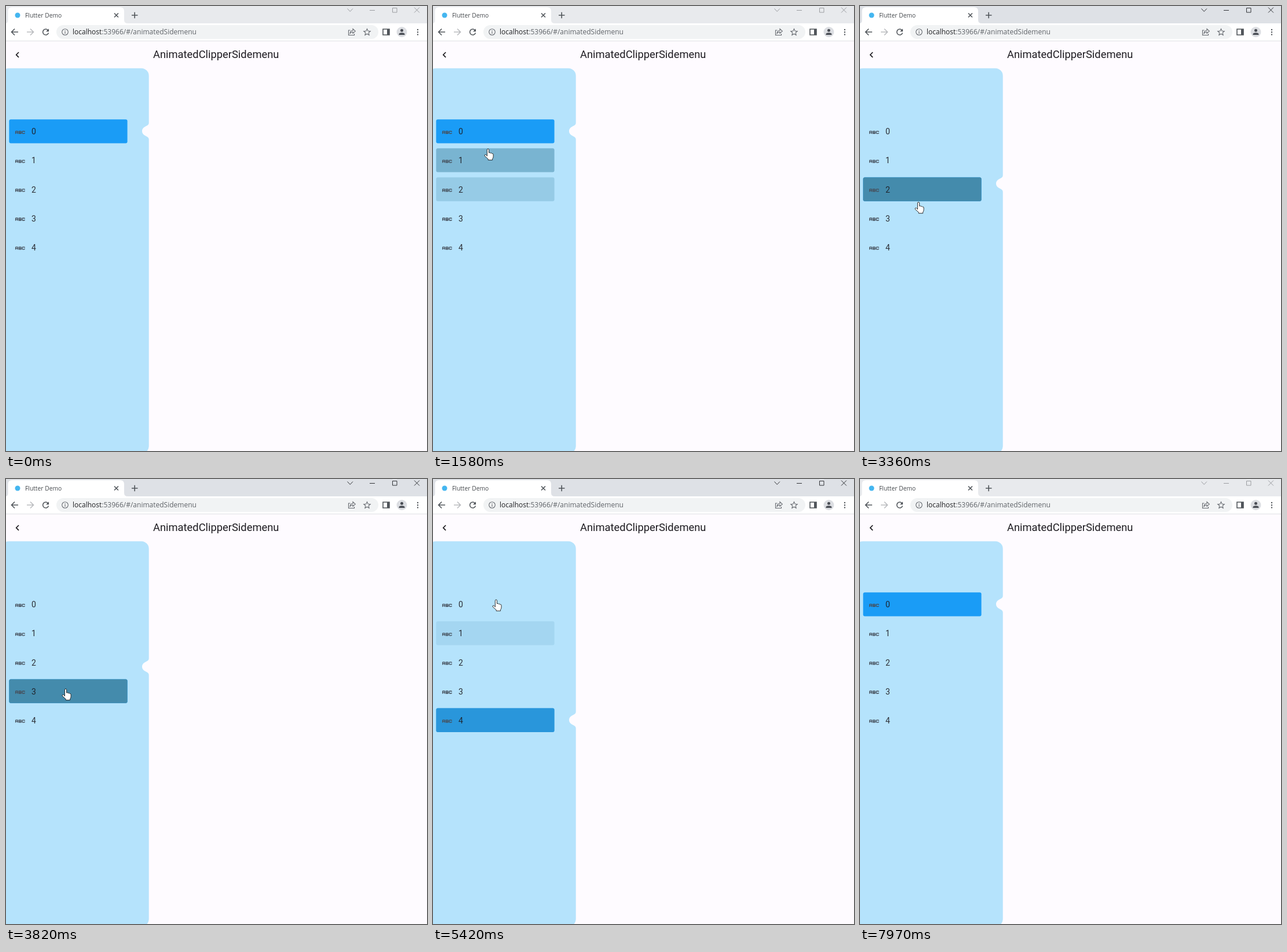
Animation, 727 px wide and 770 px high, one loop 8030 ms. Source, as an HTML page:

```html
<!DOCTYPE html>
<html lang="en">
<head>
<meta charset="utf-8">
<title>Animated side menu</title>
<style>
  html, body { margin: 0; width: 100%; height: 100%; overflow: hidden; background: #fefbff; }
  svg { display: block; }
  .ui { font-family: "Open Sans", "Noto Sans", sans-serif; }
  .app { font-family: Roboto, sans-serif; fill: #1d1b20; }
  .line { fill: none; stroke: #50555a; stroke-width: 1.6; }
  .soft { fill: none; stroke: #666a70; stroke-width: 1.1; }
  .thin { fill: none; stroke-width: 1; }
</style>
</head>
<body>
<svg width="727" height="770" viewBox="0 0 727 770">
  <!-- tab strip -->
  <rect id="strip" width="727" height="31"/>
  <path d="M0 31V30Q3.500 29 3.500 25V9Q3.500 2 10.500 2H197Q204 2 204 9V24Q204 30 210 30V31Z" fill="#fff"/>
  <circle cx="20" cy="16" r="4.500" fill="#44b6f0"/>
  <text class="ui" x="33" y="20" font-size="10.300" fill="#45494d">Flutter Demo</text>
  <path class="line" d="M187 12.500l7 7m0-7l-7 7M217 16h10.500M222.200 10.800v10.500"/>
  <path id="controls" class="thin" d="M589.500 4.500l4.700 5 4.700-5M628 7.500h9M667.500 3.500h7.500v7.500h-7.500zM705 2.500l9 9m0-9l-9 9"/>

  <!-- toolbar -->
  <rect y="30" width="727" height="31" fill="#fff"/>
  <path d="M0 60.500H727" stroke="#dfe1e4"/>
  <rect x="87" y="33" width="556" height="24" rx="12" fill="#f1f3f4"/>
  <path class="line" d="M21 45H10M15 39.500L9.500 45l5.500 5.500"/>
  <path class="line" style="stroke:#babcbf" d="M36 45h11M42 39.500l5.500 5.500-5.500 5.500"/>
  <path class="line" d="M72.800 42.300A5 5 0 1 0 73.400 46.500"/>
  <path d="M74 39.300v5h-5z" fill="#50555a"/>
  <circle class="soft" cx="102" cy="45" r="5.300"/>
  <path class="soft" d="M102 44.300v3.700M102 42v1.400"/>
  <text class="ui" x="115" y="49.300" font-size="12" fill="#202124">localhost<tspan fill="#5f6368">:53966/#/animatedSidemenu</tspan></text>
  <path class="soft" d="M594.500 42H591.500V50.500H601.500V48M594 47.500Q594.500 42.500 599 42.300V39.500L603.300 43.500 599 47.300V44.700Q596 44.700 594 47.500Z"/>
  <path class="soft" d="M623.500 39.500l1.700 3.700 4 .4-3 2.700.9 4-3.600-2.100-3.600 2.100.9-4-3-2.700 4-.4z"/>
  <path class="line" d="M651 40h11v10h-11z"/>
  <path d="M658 40h4v10h-4z" fill="#50555a"/>
  <circle cx="683.500" cy="45" r="9" fill="#dcdee2"/>
  <circle cx="683.500" cy="42.300" r="2.500" fill="#4a4e55"/>
  <path d="M678.500 50v-1.200q0-2.600 5-2.600t5 2.600V50z" fill="#4a4e55"/>
  <path d="M711 41v.01M711 45.200v.01M711 49.400v.01" stroke="#50555a" stroke-width="2.400" stroke-linecap="round"/>

  <!-- app -->
  <rect y="61" width="727" height="709" fill="#fefbff"/>
  <path d="M22 80l-4.300 4.400 4.300 4.400" fill="none" stroke="#1d1b20" stroke-width="1.700"/>
  <text class="app" x="254" y="90.300" font-size="18.330">AnimatedClipperSidemenu</text>
  <rect x="-8" y="107.700" width="254.700" height="667" rx="13" fill="#b5e3fc"/>
  <path id="notch" d="M248 203H246.700C246.700 208 235 208 235 216.500S246.700 225 246.700 230H248Z" fill="#fefbff"/>
  <g id="menu"></g>

  <g id="cursor" stroke="#1a1a1a" fill="#fff" stroke-width=".9" stroke-linejoin="round">
    <path id="arrow" d="M.5.500V14.500L3.700 11.500 6 16.700 8.200 15.700 6 10.700H10.500Z"/>
    <path id="hand" d="M-1.600.8a1.600 1.600 0 0 1 3.200 0V6q2-1 2.800.6 2-.8 2.600.8 2-.4 2.100 1.400v3.500q0 2.500-1.500 4.200v2h-7.400v-1.800L-5.600 11.600q-1-2 .8-2.400 1.200-.2 2.200 1.200l1 1.300z"/>
  </g>
</svg>
<script>
const LOOP = 8030, STEP = 5;
const ROWS = 5, TOP = 196.2, PITCH = 50.1, HEIGHT = 41.3, LEFT = 5.4, RIGHT = 209.6;
const HOVER_LAG = 24, HOVER_FADE = 200, SELECT_FADE = 130, SLIDE = 520;
const ENTER = 170, LEAVE = 7300, FOCUS = 1880, BLUR = 7970;

// pointer moves: [start, end, x, y]
const START = [691, 748];
const MOVES = [
  [200, 240, 658, 685], [440, 1180, 87, 350],
  [1180, 1425, 92, 296], [1425, 1580, 95, 248],
  [2150, 2450, 101, 312], [3200, 3360, 101, 340], [3360, 3480, 103, 364],
  [4050, 4360, 118, 427], [5247, 5420, 109, 211], [5420, 5446, 108, 178],
  [5540, 5680, 87, 215], [6960, LEAVE, 729, 740]
];
// clicks: [time, row]
const CLICKS = [[1930, 1], [2985, 2], [3690, 3], [4690, 4], [6310, 0]];

const $ = id => document.getElementById(id);
const part = (t, a, b) => Math.min(1, Math.max(0, (t - a) / (b - a)));
const mix = (a, b, k) => a + (b - a) * k;
const ease = k => k * k * (3 - 2 * k);

function tip(t) {
  let [x, y] = START;
  for (const [a, b, toX, toY] of MOVES) {
    const k = part(t, a, b);
    x = mix(x, toX, k);
    y = mix(y, toY, k);
  }
  return [x, y];
}

function hoveredRow(t) {
  const [x, y] = tip(t - HOVER_LAG);
  const row = Math.floor((y - TOP) / PITCH);
  const inside = x > LEFT && x < RIGHT && y - TOP - row * PITCH < HEIGHT;
  return inside ? row : -1;
}

const selectedRow = t => CLICKS.reduce((row, [ms, to]) => t >= ms ? to : row, 0);

// fade levels of one row over the loop, approaching 0 or 1 at a steady rate
function fades(isOn, ms) {
  const levels = [];
  let level = isOn(0) ? 1 : 0;
  for (let t = 0; t <= LOOP; t += STEP) {
    const d = STEP / ms;
    level = Math.min(1, Math.max(0, level + (isOn(t) ? d : -d)));
    levels.push(level);
  }
  return levels;
}

const ABC = 'M16.600 221.200V217.300q0-.6.6-.6h2.600q.6 0 .6.6v3.900M16.600 219.300h3.800' +
  'M22.500 216.700h3q.7 0 .7.700v.9q0 .7-.7.700h-3 3.200q.7 0 .7.700v.3q0 .7-.7.700h-3.200z' +
  'M32.100 218v-.8q0-.5-.6-.5h-2.600q-.6 0-.6.6v2.800q0 .6.6.6h2.600q.6 0 .6-.5v-.8';

const fill = color =>
  `<rect x="${LEFT}" y="${TOP}" width="${RIGHT - LEFT}" height="${HEIGHT}" rx="3" fill="${color}"/>`;

const rows = Array.from({ length: ROWS }, (_, i) => {
  $('menu').insertAdjacentHTML('beforeend',
    `<g transform="translate(0 ${i * PITCH})">${fill('#1a9cf6')}${fill('#448bac')}
     <path d="${ABC}" fill="none" stroke="#46505c" stroke-width="1.300"/>
     <text class="app" x="44" y="222.400" font-size="14" fill-opacity=".9">${i}</text></g>`);
  const [sel, hov] = $('menu').lastElementChild.children;
  return {
    sel, hov,
    selected: fades(t => selectedRow(t) === i, SELECT_FADE),
    hovered: fades(t => hoveredRow(t) === i, HOVER_FADE)
  };
});

function draw(t) {
  const n = Math.floor(t / STEP);
  for (const row of rows) {
    row.sel.setAttribute('opacity', row.selected[n]);
    row.hov.setAttribute('opacity', row.hovered[n]);
  }

  const slot = CLICKS.reduce((at, [ms, to]) => mix(at, to, ease(part(t, ms, ms + SLIDE))), 0);
  $('notch').setAttribute('transform', `translate(0 ${slot * PITCH})`);

  const [x, y] = tip(t);
  const onMenu = x < RIGHT && y > TOP && y < TOP + ROWS * PITCH;
  const shown = t >= ENTER && t < LEAVE;
  $('cursor').setAttribute('transform', `translate(${x} ${y})`);
  $('hand').setAttribute('opacity', +(shown && onMenu));
  $('arrow').setAttribute('opacity', +(shown && !onMenu));

  const active = t >= FOCUS && t < BLUR;
  $('strip').setAttribute('fill', active ? '#dee1e6' : '#e8eaed');
  $('controls').setAttribute('stroke', active ? '#303236' : '#9b9da1');
}

const begin = performance.now();
function tick() {
  draw((performance.now() - begin) % LOOP);
  requestAnimationFrame(tick);
}
tick();
</script>
</body>
</html>
```
